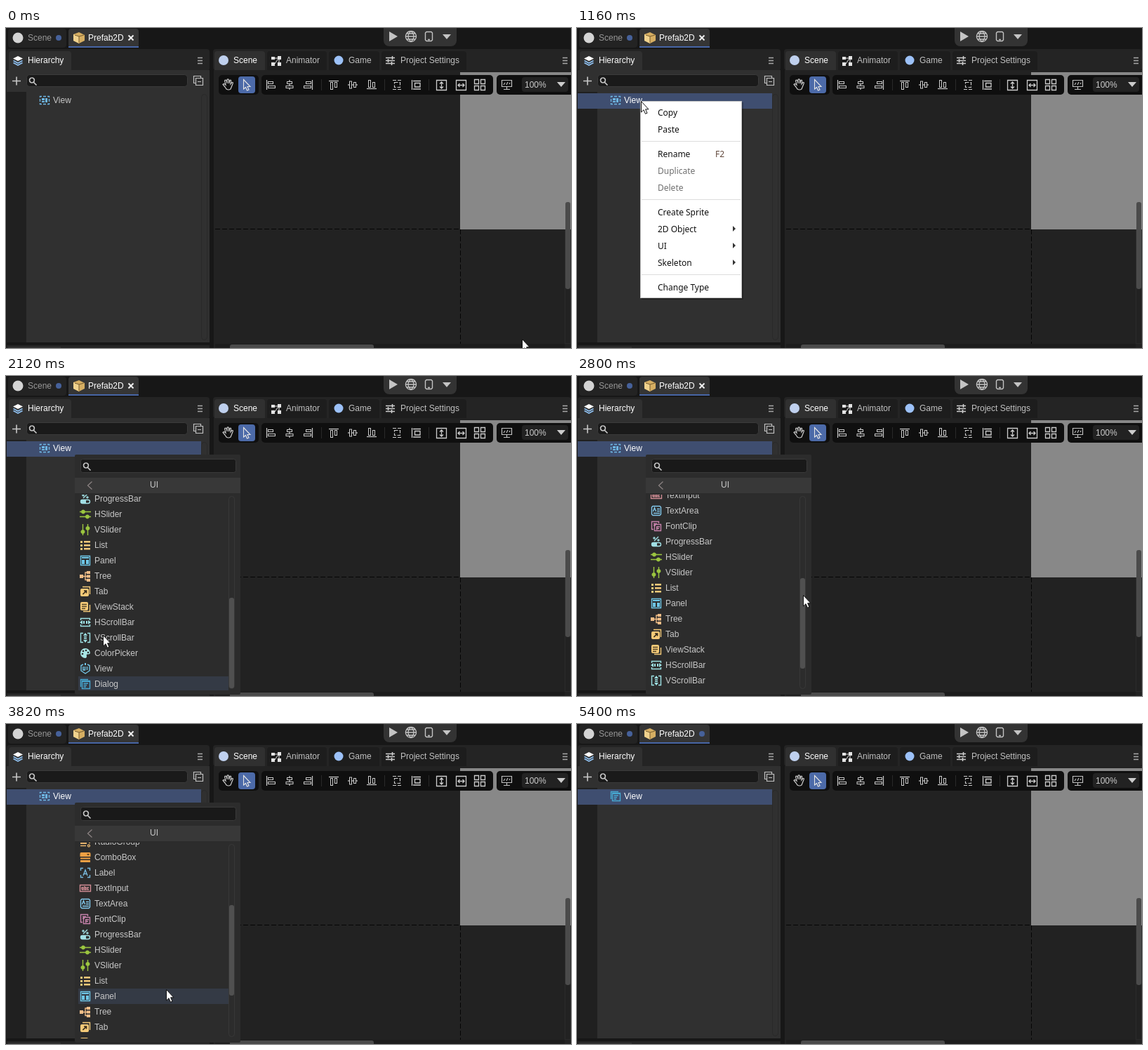
Animation, 805 px wide and 456 px high, one loop 6000 ms. Source, as an HTML page:

```html
<!DOCTYPE html>
<html>
<head>
<meta charset="utf-8">
<style>
html, body { margin: 0; width: 100%; height: 100%; overflow: hidden; background: #171717; }
svg { display: block; }
text { font: 12px Arial, "Liberation Sans", sans-serif; white-space: pre; }
#menu text { font: 12px "Noto Sans", "Open Sans", sans-serif; }
</style>
</head>
<body>
<svg id="stage" width="805" height="456" viewBox="0 0 805 456"></svg>
<script>
const rect = (x, y, w, h, fill, r = 0, more = '') =>
  `<rect x="${x}" y="${y}" width="${w}" height="${h}" fill="${fill}" rx="${r}" ${more}/>`;
const frame = (x, y, w, h, fill, stroke, r) => rect(x + .5, y + .5, w - 1, h - 1, fill, r, `stroke="${stroke}"`);
const text = (x, y, s, fill = '#c8c8c8', more = '') => `<text x="${x}" y="${y}" fill="${fill}" ${more}>${s}</text>`;
const line = (d, stroke = '#c8c8c8', w = 1, more = '') => `<path d="${d}" fill="none" stroke="${stroke}" stroke-width="${w}" ${more}/>`;
const shape = (d, fill = '#c8c8c8', more = '') => `<path d="${d}" fill="${fill}" ${more}/>`;
const dot = (x, y, r, fill) => `<circle cx="${x}" cy="${y}" r="${r}" fill="${fill}"/>`;
const group = (x, y, s, id = '') => `<g ${id && `id="${id}"`} transform="translate(${x} ${y})">${s}</g>`;
const lens = (x, y) => line(`M${x + 4} ${y}a3.5 3.5 0 1 1 -.1 0M${x + 6.5} ${y + 6.5}l4 4`, '#c8c8c8', 1.7);
const burger = x => line(`M${x} 42.5h7M${x} 46.5h7M${x} 50.5h7`, '#a8a8a8', 1.4);

// name, colour, stroked outline, filled part (16 x 16 box)
const items = [
  ['Box', '#67c9e8', 'M1.5 4V2.5H4M6 2.5H10M12 2.5H14.5V4M14.5 6V10M14.5 12V13.5H12M10 13.5H6M4 13.5H1.5V12M1.5 10V6', 'M4 5H8V8H4ZM9 5H12V11H9ZM4 9H8V11H4Z'],
  ['HBox', '#67c9e8', 'M1.5 3.5H14.5V12.5H1.5Z', 'M3 5H7V11H3ZM9 5H13V11H9Z'],
  ['VBox', '#7cc9ea', 'M3.5 1.5H12.5V14.5H3.5Z', 'M5 3H11V7H5ZM5 9H11V13H5Z'],
  ['Image', '#eda585', 'M4 2.5H14.5V12', 'M1 4H13V15H1Z'],
  ['Clip', '#d5e6f5', 'M2 14.5H7', 'M13 1L14 3L8 11L5 9ZM4 10L7 12L2 14Z'],
  ['Button', '#e8764a', '', 'M2 4H14Q16 4 16 6V11Q16 13 14 13H2Q0 13 0 11V6Q0 4 2 4Z'],
  ['CheckBox', '#62b8f2', 'M4 1.5H14.5V12', 'M3 4H11Q13 4 13 6V13Q13 15 11 15H3Q1 15 1 13V6Q1 4 3 4Z'],
  ['Radio', '#9fb843', 'M8 1A7 7 0 1 1 7.9 1', 'M8 3A5 5 0 1 1 7.9 3'],
  ['RadioGroup', '#e3b26d', 'M1 2.5H9M1 13.5H9M13 1A1.5 1.5 0 1 1 12.9 1M13 12A1.5 1.5 0 1 1 12.9 12', 'M1 5H8V7H1ZM1 9H10V11H1ZM13 6H15V10H13Z'],
  ['ComboBox', '#efa043', '', 'M2 1H14Q15.500 1 15.500 3V7H.5V3Q.5 1 2 1ZM1 8.500H15V10.500H1ZM1 12H15V15H1Z'],
  ['Label', '#78b9dd', 'M1.500 5V1.500H5M11 1.500H14.500V5M14.500 11V14.500H11M5 14.500H1.500V11M5 12L8 4L11 12M6 9.500H10', ''],
  ['TextInput', '#d08c94', 'M.5 3.500H15.500V12.500H.5ZM3 10V7H5V10H3M7 5V10H9V7H7M13 7H11V10H13', ''],
  ['TextArea', '#82c8ec', 'M3 1.500H13L14.500 3V13L13 14.500H3L1.500 13V3ZM3.500 9L5.500 4L7.500 9M9 5.500H13M9 8.500H13M4 11.500H13', ''],
  ['FontClip', '#c581aa', 'M4 12.500H1.500V1.500H11.500V4M4 4.500H9M4 7H7M5.500 5.500H14.500V14.500H5.500Z', 'M8 8H13V9.500H9.500V10.500H12V12H9.500V13.500H8Z'],
  ['ProgressBar', '#a1dfe4', 'M5 7L11 1M5 2A1 1 0 1 1 4.900 2M11 5A1 1 0 1 1 10.900 5M4 9.500H12A2.500 2.500 0 0 1 12 14.500H4A2.500 2.500 0 0 1 4 9.500', 'M4 9H9V15H4A3 3 0 0 1 4 9Z'],
  ['HSlider', '#9bc53f', 'M0 4.500H16M0 11.500H16', 'M5 1.500A3 3 0 1 1 4.900 1.500ZM11 8.500A3 3 0 1 1 10.900 8.500Z'],
  ['VSlider', '#9bc53f', 'M4.500 0V16M11.500 0V16', 'M4.500 8A3 3 0 1 1 4.400 8ZM11.500 3A3 3 0 1 1 11.400 3Z'],
  ['List', '#f3c979', '', 'M1 2H4V5H1ZM1 7H4V10H1ZM1 12H4V15H1ZM6 2H15V4.500H6ZM6 7H15V9.500H6ZM6 12H15V14.500H6Z'],
  ['Panel', '#6ec6e6', 'M1.500 1.500H14.500V14.500H1.500Z', 'M3 3H13V5H3ZM3 7H7V13H3ZM9 7H13V13H9Z'],
  ['Tree', '#efbd87', 'M4 8.500H8M11 3H8V13.500H11M8 8.500H11', 'M0 6H5V11H0ZM10 1H15V5H10ZM10 6.500H15V10.500H10ZM10 12H15V16H10Z'],
  ['Tab', '#f5ca78', 'M4 1.500H14.500V12', 'M3 4H11Q13 4 13 6V13Q13 15 11 15H3Q1 15 1 13V6Q1 4 3 4Z'],
  ['ViewStack', '#f5ca78', 'M14.500 5V14.500H5', 'M3 1H10Q12 1 12 3V11Q12 13 10 13H3Q1 13 1 11V3Q1 1 3 1Z'],
  ['HScrollBar', '#9de1e4', 'M1.500 5V2.500H14.500V5M1.500 11V13.500H14.500V11', 'M0 8L4 5V11ZM16 8L12 5V11ZM5 6H7V10H5ZM9 6H11V10H9Z'],
  ['VScrollBar', '#9de1e4', 'M5 1.500H1.500V14.500H5M11 1.500H14.500V14.500H11', 'M8 1L11 5H5ZM8 15L11 11H5ZM6 6H10V7.500H6ZM6 8.500H10V10H6Z'],
  ['ColorPicker', '#a9e7e6', '', 'M8 1A7 7 0 0 1 15 8Q14 10 11 9.500Q9 10 10 12Q10 15 8 15A7 7 0 0 1 8 1Z'],
  ['View', '#73c5e6', 'M5 2L2 3.500V11L8 15L14 11V3.500L11 2M5 5V10H7.500V5M10.500 5V10', 'M7 0H9V3H7Z'],
  ['Dialog', '#47a9d2', 'M1.500 12V1.500H12M3.500 3.500H14.500V14.500H3.500ZM5.500 7H12M5.500 9.500H10M5.500 12H9', 'M3 3H15V5H3Z']
];
const marks = {
  Image: shape('M2 13L5 9L8 12L10 10L12 13ZM4 6h2v2h-2Z', '#623d35'),
  Button: line('M3 7V10M4 8.500H6M8 7V10M9 8.500L11 7M11 10L13 7', '#fff'),
  CheckBox: line('M4 9L6.500 12L10.500 7', '#fff', 2),
  Radio: line('M8 3A5 5 0 1 1 7.9 3', '#2c2c2c'),
  ComboBox: shape('M10 3H14L12 5.500Z', '#573a1b'),
  Tab: line('M4.500 12L9.500 7M6 7H9.500V10.500', '#33291a', 1.7),
  ViewStack: line('M3 4.500H10M3 7.500H10M3 10.500H8', '#57472a', 1.3),
  ColorPicker: dot(5, 5, 1.3, '#2c2c2c') + dot(9, 4, 1.3, '#2c2c2c') + dot(4, 9, 1.3, '#2c2c2c') + dot(12, 7, 1.3, '#2c2c2c')
};
const icon = ([name, color, outline, fill]) => line(outline, color, 1.4) + shape(fill, color) + (marks[name] || '');

const topBar = () =>
  rect(3, 1, 83, 27, '#232323', 4) + dot(17, 14, 7.5, '#d4d4d4') + text(31, 18, 'Scene', '#989898') + dot(75, 14, 4, '#46619a') +
  rect(89, 1, 100, 27, '#353535', 4) + rect(89, 26, 100, 2, '#4765a5') +
  shape('M96 9L104 6L112 10V18L104 22L96 18Z', '#d6ae62') + shape('M96 9L104 12V22L96 18Z', '#f0d28d') +
  line('M98 10L104 12L111 10M104 12V21', '#765c30') + text(117, 18, 'Prefab2D', '#fff') +
  `<g id="close">${line('M174.500 10.500L181.500 17.500M181.500 10.500L174.500 17.500', '#eee', 2)}</g><g id="dirty">${dot(178, 14, 4, '#46619a')}</g>` +
  rect(538, -8, 104, 34, '#333', 8) + shape('M546 5L558 12L546 19Z', '#c4c4c4') +
  line('M577 4.500A7.500 7.500 0 1 1 576.900 4.500M577 4.500Q569 12 577 19.500Q585 12 577 4.500M569.500 12H584.500M571 8H583M571 16H583', '#c4c4c4', 1.3) +
  line('M599 5.500H606L607.500 7V17L606 18.500H599L597.500 17V7ZM601 16.500H604', '#c4c4c4', 1.4) + shape('M622 9H634L628 16Z', '#c4c4c4');

const hierarchy = () =>
  rect(1, 30, 289, 31, '#242424', 4) + rect(4, 33, 89, 30, '#303030', 4) + rect(1, 60, 289, 388, '#303030') + rect(1, 91, 28, 357, '#202020') +
  shape('M10 43.500L17 40L24 43.500L17 47Z', '#fff') + line('M10.500 46.500L17 50L23.500 46.500M10.500 49.500L17 53L23.500 49.500', '#8fc0f0', 1.6) +
  text(31, 50, 'Hierarchy', '#fff') + burger(273) + line('M9 75.500H21M15 69.500V81.500', '#c8c8c8', 1.6) +
  frame(29, 66, 230, 18, '#1a1a1a', '#3b3b3b', 4) + lens(33, 71) +
  line('M270.500 78.500H267.500V68.500H277.500V71M270.500 71.500H280.500V81.500H270.500ZM273 76.500H278', '#c0c0c0', 1.2) +
  frame(278, 94, 9, 351, 'none', '#292929', 4) +
  rect(1, 93, 277, 22, '#3f4e70', 0, 'id="row"') +
  group(47, 95, icon(['', '#6db5e2', items[0][2], items[0][3]]), 'viewIcon') + group(47, 95, icon(items[26]), 'dialogIcon') +
  text(67, 107, 'View', '#c8c8c8', 'id="label"') + rect(1, 452, 289, 4, '#242424') + rect(3, 454, 75, 2, '#303030');

const tab = (x, w, name, tx, active) => rect(x, 33, w, 30, active ? '#303030' : '#1d1d1d', 4) + text(tx, 50, name, active ? '#fff' : '#c0c0c0');
// bars aligned along one axis; turned by 90 degrees for the second set
const bars = (x, guide, a, b, turn) => `<g transform="translate(${x} 81)${turn ? ' rotate(90)' : ''}">` +
  line(`M${guide} -7V7`, '#ccc', 1.2) + frame(a, -5, 8, 4, '#0f0f0f', '#ccc', 0) + frame(b, 1, 11, 4, '#0f0f0f', '#ccc', 0) + '</g>';

const sceneView = () =>
  rect(295, 30, 510, 30, '#242424', 4) + tab(297, 72, 'Scene', 324, true) + tab(372, 85, 'Animator', 399) +
  tab(460, 72, 'Game', 488) + tab(535, 121, 'Project Settings', 562) + rect(296, 60, 509, 396, '#222') + burger(793) +
  dot(310, 46, 7, '#bfd0ee') + dot(474, 46, 6.5, '#9cc1f8') +
  shape('M378 41H383V45H378ZM387 40H392V45H387ZM378 49H383V54H378ZM387 49H392V54H387Z', '#e4e4e4') + line('M383 43H387M389 45V49M383 51L387 45', '#e4e4e4') +
  line('M541 42.500H554M541 46.500H554M541 50.500H554M550.500 40V45M544.500 44V49M549.500 48V53', '#d0d0d0', 1.5) +
  rect(647, 63, 158, 224, '#888') +
  line('M298 286.500H647', '#050505', 1, 'stroke-dasharray="7 3"') + line('M647.500 287V450', '#050505', 1, 'stroke-dasharray="7 3"') +
  frame(796, 287, 9, 163, 'none', '#2b2b2b', 0) + rect(797, 248, 7, 124, '#4b4b4b', 3) +
  rect(298, 450, 498, 6, '#1c1c1c') + rect(319, 451, 205, 8, '#4b4b4b', 3);

const toolbar = () =>
  rect(303, 67, 57, 28, '#0f0f0f', 5) + rect(364, 67, 330, 28, '#0f0f0f', 5) + rect(699, 67, 112, 28, '#0f0f0f', 5) +
  line('M312 84L309 80.500Q310 78.500 313 81L311.500 75Q313 73 314.500 76L315 79V73.500Q316.500 72 317.500 74V79L319 74.500Q321 73.500 320.500 76L320 80L322 77.500Q324 77 323 79.500L320 87Q317 89 314 87Z', '#ccc', 1.2) +
  rect(331, 69, 24, 24, '#4c6aa8', 4) + line('M338.500 73.500V87L341.500 84.500L343.500 89L346 88L344 83.500H348Z', '#e4e4e4', 1.1) +
  bars(377, -5.5, -4, -4) + bars(404, 0, -4, -5.5) + bars(431, 5.5, -4, -7) +
  bars(467, -5.5, -4, -4, true) + bars(494, 0, -4, -5.5, true) + bars(521, 5.5, -4, -7, true) +
  line('M449.500 73V89M539.500 73V89M602.500 73V89', '#292929') +
  line('M551 74.500H563M551 87.500H563M553.500 77.500H561.500V84.500H553.500Z', '#ccc', 1.2, 'stroke-dasharray="5 2"') +
  line('M578.500 74V88M580 75.500H591M580 87H591M582.500 78.500H590V84H582.500Z', '#ccc', 1.3) +
  line('M613.500 74.500H627.500V88.500H613.500ZM620.500 77V86M618 79.500L620.500 77L623 79.500M618 83.500L620.500 86L623 83.500', '#ccc', 1.3) +
  line('M641.500 74.500H655.500V88.500H641.500ZM644 81.500H653M646.500 79L644 81.500L646.500 84M650.500 79L653 81.500L650.500 84', '#ccc', 1.3) +
  line('M667.500 73.500H673.500V79.500H667.500ZM676.500 73.500H682.500V79.500H676.500ZM667.500 82.500H673.500V88.500H667.500ZM676.500 82.500H682.500V88.500H676.500Z', '#ccc', 1.3) +
  line('M706.500 74.500H720.500V83.500H706.500ZM713.500 84V87M709 87.500H718M709 81L711 78M713 81L715 77M717 80L718 78', '#c0c0c0', 1.2) +
  rect(735, 70, 66, 21, '#222', 4) + text(739, 85, '100%') + shape('M785 77H797L791 84Z', '#ccc');

const menuRows = [['Copy', 121], ['Paste', 145], ['Rename', 180], ['Duplicate', 204, 1], ['Delete', 228, 1], ['Create Sprite', 263],
  ['2D Object', 287], ['UI', 311], ['Skeleton', 335], ['Change Type', 370]];
const menu = () => '<g id="menu">' + rect(92, 106, 145, 281, '#000', 0, 'opacity=".25"') + frame(90, 104, 145, 281, '#fff', '#c4c4c4', 0) +
  rect(91, 0, 143, 24, '#e8e8e8', 0, 'id="menuHover"') + line('M92 161.500H233M92 244.500H233M92 351.500H233', '#dcdcdc') +
  menuRows.map(([s, y, off]) => text(115, y + 4, s, off ? '#707070' : '#111')).join('') + text(197, 184, 'F2', '#61483c') +
  [287, 311, 335].map(y => shape(`M222 ${y - 5}L226 ${y - 1}L222 ${y + 3}Z`, '#333')).join('') + '</g>';

const ROW = 22, TOP = 169;
const picker = () => '<g id="picker">' + rect(98, 112, 236, 342, '#2c2c2c', 2) + frame(106, 118, 222, 20, '#191919', '#3a3a3a', 3) + lens(110, 124) +
  rect(98, 145, 236, 22, '#383838') + line('M122.500 150.500L116.500 156L122.500 161.500', '#8e8585', 1.2) + text(205, 159, 'UI') +
  `<clipPath id="list"><rect x="98" y="${TOP}" width="219" height="279"/></clipPath><g clip-path="url(#list)"><g id="rows">` +
  rect(103, 0, 214, ROW, '#343a45', 0, 'id="hover"') +
  items.map((it, i) => group(105, TOP + i * ROW + 3, icon(it)) + text(126, TOP + i * ROW + 15, it[0])).join('') + '</g></g>' +
  frame(317, 171, 9, 275, 'none', '#383838', 4) + rect(318, 171, 7, 129, '#505050', 3, 'id="thumb"') + '</g>';

const arrow = group(0, 0, shape('M.5 .5V16L4 12.700L6.500 18.300L9 17.200L6.600 11.800H11Z', '#fff', 'stroke="#111"'), 'cursor');
document.getElementById('stage').innerHTML = topBar() + hierarchy() + sceneView() + toolbar() + menu() + picker() + arrow;

const bursts = [[70, 630, 9], [700, 700, 1], [1030, 1160, 2], [1560, 2120, 9], [2190, 2730, 8], [2800, 3080, 5], [3280, 3420, 3],
  [3620, 3690, 2], [3820, 3960, 3], [4160, 4440, 5], [4570, 4710, 3], [4780, 5330, 9], [5400, 5400, 1]];
const ticks = bursts.flatMap(([a, b, n]) => Array.from({ length: n }, (_, i) => a + (b - a) * i / Math.max(1, n - 1)));

const path = [[0, 735, 443], [140, 690, 395], [280, 480, 240], [420, 230, 95], [490, 140, 69], [560, 100, 82], [630, 89, 100], [700, 91, 104],
  [1490, 91, 104], [1560, 86, 108], [1630, 92, 180], [1700, 112, 290], [1770, 135, 360], [1840, 138, 369], [2120, 138, 369],
  [2190, 150, 366], [2400, 230, 340], [2730, 312, 322], [2800, 322, 312], [3080, 322, 166], [3210, 312, 192], [3280, 303, 198],
  [3350, 262, 300], [3420, 228, 378], [4090, 228, 378], [4160, 226, 372], [4230, 205, 320], [4300, 185, 262], [4370, 178, 285],
  [4440, 172, 340], [4500, 170, 412], [4570, 170, 430], [4710, 160, 436], [4780, 175, 432], [5330, 706, 450]];
const scrolls = [[1980, 0], [2050, 210], [2120, 313], [2190, 315], [2730, 315], [3080, 0], [3550, 0], [3820, 188], [3960, 315]];

function at(keys, t) {
  const i = keys.findIndex(k => k[0] > t);
  if (i < 1) return keys[i ? keys.length - 1 : 0].slice(1);
  const a = keys[i - 1], b = keys[i], f = (t - a[0]) / (b[0] - a[0]);
  return a.slice(1).map((v, j) => Math.round(v + (b[j + 1] - v) * f));
}

const $ = id => document.getElementById(id);
const show = (id, on) => $(id).setAttribute('display', on ? 'inline' : 'none');
const move = (id, x, y) => $(id).setAttribute('transform', `translate(${x} ${y})`);

function draw(ms) {
  const t = ticks.reduce((last, k) => k <= ms ? k : last, 0);
  const [x, y] = at(path, t), [scroll] = at(scrolls, t);
  const selected = t >= 1030, done = t >= 4780;
  move('cursor', x, y);
  show('cursor', t < 5400);

  show('row', selected || (x < 278 && y >= 93 && y < 115));
  $('row').setAttribute('fill', selected ? '#3f4e70' : '#343a45');
  $('label').setAttribute('fill', selected ? '#fff' : '#c8c8c8');
  show('viewIcon', !done);
  show('dialogIcon', done);
  show('close', !done);
  show('dirty', done);

  show('menu', t >= 1160 && t < 1910);
  const over = menuRows.find(r => Math.abs(r[1] - y) < 12);
  show('menuHover', over && x > 90);
  if (over) $('menuHover').setAttribute('y', over[1] - 12);

  show('picker', t >= 1980 && !done);
  move('rows', 0, -scroll);
  $('thumb').setAttribute('y', 171 + Math.round(scroll * .463));
  // highlight trails the pointer slightly
  const [hx, hy] = at(path, t - 30);
  const hit = t < 2190 ? 26 : Math.floor((hy - TOP + scroll) / ROW);
  show('hover', hx < 317 && hit >= 0 && hit < items.length);
  $('hover').setAttribute('y', TOP + hit * ROW);
}

const start = performance.now();
function loop() {
  draw((performance.now() - start) % 6000);
  requestAnimationFrame(loop);
}
loop();
</script>
</body>
</html>
```
